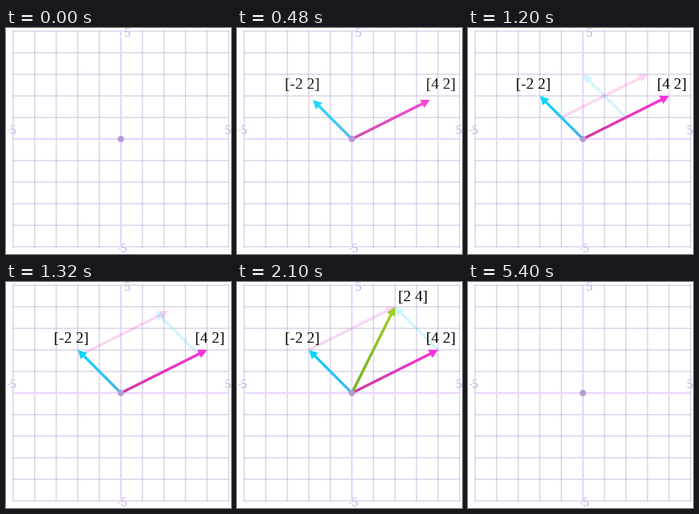
These frames come from a looping animation (282 by 283 pixels, 5430 ms). A matplotlib script:

```python
import numpy as np
import matplotlib.pyplot as plt
from matplotlib.animation import FuncAnimation
from matplotlib.colors import to_rgb
from matplotlib.patches import Circle
from matplotlib.path import Path

W, H, DPI = 282, 283, 64
STEP, LOOP = 30, 5430
UNIT = 27
ORIGIN = np.array([144.0, 139.0])
PX = 72 / DPI  # points per pixel

fig = plt.figure(figsize=(W / DPI, H / DPI), dpi=DPI, facecolor="white")
ax = fig.add_axes([0, 0, 1, 1])
ax.set_xlim(0, W)
ax.set_ylim(H, 0)
ax.axis("off")


def to_stage(x, y):
    return ORIGIN + UNIT * np.array([x, -y])


def progress(t, start, end):
    return min(max((t - start) / (end - start), 0), 1)


def soft_stop(p):
    """Nearly linear, slowing down to rest at the end."""
    return p + p ** 2.5 * (1 - p)


def segment(a, b, **style):
    (x0, y0), (x1, y1) = to_stage(*a), to_stage(*b)
    ax.plot([x0, x1], [y0, y1], solid_capstyle="projecting", snap=False, **style)


def label(x, y, text, family, size, **style):
    return ax.text(x, y, text, family=family, fontsize=size * PX,
                   va="baseline", **style)


class Vector:
    HEAD, HALF_HEAD, HALF_SHAFT = 11, 5.7, 1.7

    def __init__(self, x, y, tail_color, tip_color, z):
        self.delta = UNIT * np.array([x, -y])
        a, b = np.array(to_rgb(tail_color)), np.array(to_rgb(tip_color))
        ramp = a + (b - a) * np.linspace(0, 1, 64)[:, None]
        if x < 0:
            ramp = ramp[::-1]
        self.image = ax.imshow(ramp[None], extent=(0, 1, 1, 0), aspect="auto",
                               interpolation="bilinear", zorder=z)
        self.image.set_visible(False)

    def place(self, tail, scale, alpha):
        visible = scale > 0 and alpha > 0
        self.image.set_visible(visible)
        if not visible:
            return
        tip = tail + self.delta * scale
        length = np.hypot(*(tip - tail))
        along = (tip - tail) / length
        across = np.array([-along[1], along[0]])
        k = min(1, length / self.HEAD)
        neck = length - self.HEAD * k
        s, h = self.HALF_SHAFT * k, self.HALF_HEAD * k
        outline = [(0, s), (neck, s), (neck, h), (length, 0),
                   (neck, -h), (neck, -s), (0, -s), (0, s)]
        points = [tail + u * along + v * across for u, v in outline]

        left, right = sorted((tail[0], tip[0]))
        top, bottom = sorted((tail[1], tip[1]))
        pad = 6
        self.image.set_extent((left - pad, right + pad, bottom + pad, top - pad))
        self.image.set_clip_path(Path(points, closed=True), ax.transData)
        self.image.set_alpha(alpha)


# Grid and axes
for i in range(-5, 6):
    if i:
        thin = dict(color="#b2a6d0", alpha=0.5, lw=1.4 * PX, zorder=1)
        segment((i, -5), (i, 5), **thin)
        segment((-5, i), (5, i), **thin)
thick = dict(color="#e8d5fc", lw=2 * PX, zorder=2)
segment((0, -5), (0, 5), **thick)
segment((-5, 0), (5, 0), **thick)

for x, y, text in [(148, 11, "5"), (139.5, 281, "-5"),
                   (273.5, 133, "5"), (0, 133, "-5")]:
    label(x, y, text, "DejaVu Serif", 13.5, color="#c6b0e8", zorder=2)

ax.add_patch(Circle(ORIGIN, 4, fc="#b39ad6", ec="none", zorder=8))

# Vectors, their shifted copies, and the sum
PINK = (4, 2, "#cc3c9a", "#ff30e0")
CYAN = (-2, 2, "#4cb0ea", "#00dcff")
GREEN = (2, 4, "#6aae22", "#a0d428")

pink_copy, cyan_copy = Vector(*PINK, 3), Vector(*CYAN, 3)
pink, cyan = Vector(*PINK, 5), Vector(*CYAN, 5)
total = Vector(*GREEN, 6)

name_style = dict(family="Liberation Serif", size=19.4, color="black", zorder=9)
part_names = [label(60.5, 75.6, "[-2 2]", **name_style),
              label(237, 75.6, "[4 2]", **name_style)]
total_name = label(201.5, 23.6, "[2 4]", **name_style)


def draw(frame):
    t = frame * STEP
    fade = 1 - progress(t, 5250, 5400)
    grow = soft_stop(progress(t, 30, 600))
    shift = progress(t, 1050, 1350)
    add = soft_stop(progress(t, 1530, 2100))

    for v in (pink, cyan):
        v.place(ORIGIN, grow, grow * fade)
    copy_alpha = 0.2 * fade if shift > 0 else 0
    pink_copy.place(ORIGIN + cyan.delta * shift, 1, copy_alpha)
    cyan_copy.place(ORIGIN + pink.delta * shift, 1, copy_alpha)
    total.place(ORIGIN, add, add * fade)

    for name in part_names:
        name.set_alpha(grow * fade)
    total_name.set_alpha(add * fade)
    return []


anim = FuncAnimation(fig, draw, frames=LOOP // STEP, interval=STEP,
                     repeat=True, repeat_delay=0, blit=False)
plt.show()
```
